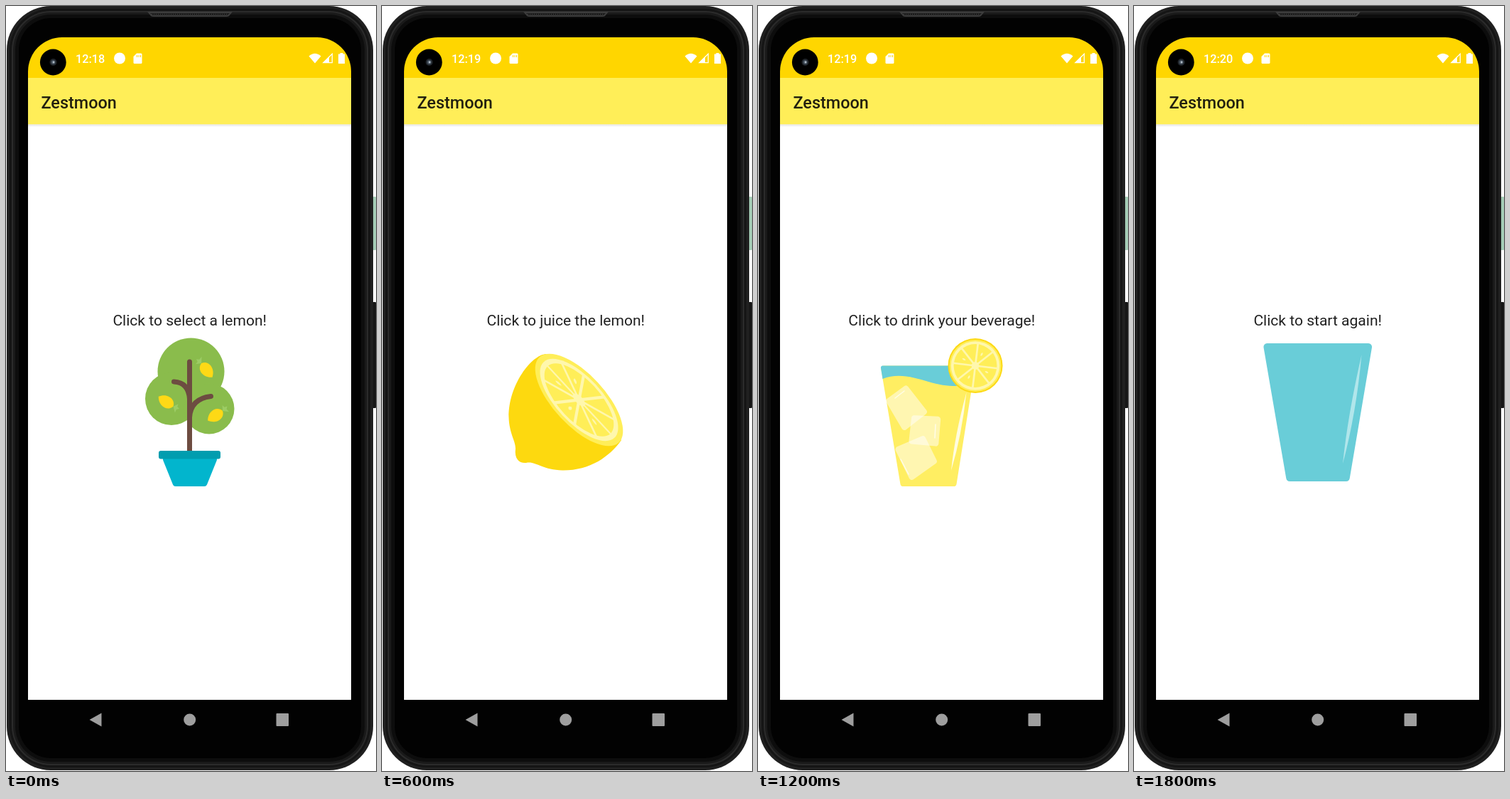
Recreate the animation shown at these times as an HTML page with a canvas. Size 521 by 1075 pixels, loop 2400 ms.

```html
<!DOCTYPE html>
<html lang="en">
<head>
<meta charset="utf-8">
<title>Juice app</title>
<style>
html, body { margin: 0; width: 100%; height: 100%; overflow: hidden; background: #fff; }
canvas { display: block; }
</style>
</head>
<body>
<canvas id="stage" width="521" height="1075"></canvas>
<script>
const ctx = document.getElementById('stage').getContext('2d');
const TAU = Math.PI * 2;
const STEP = 600;
const YELLOW = '#ffd600', LIGHT = '#ffee58', PALE = '#fff7ad', CYAN = '#69cdd8';

const steps = [
  { clock: '12:18', text: 'Click to select a lemon!', draw: drawTree },
  { clock: '12:19', text: 'Click to juice the lemon!', draw: drawLemon },
  { clock: '12:19', text: 'Click to drink your beverage!', draw: drawDrink },
  { clock: '12:20', text: 'Click to start again!', draw: drawEmptyGlass }
];

function fillPath(d, color) {
  ctx.fillStyle = color;
  ctx.fill(new Path2D(d));
}

function strokePath(d, color, width, cap = 'round') {
  ctx.strokeStyle = color;
  ctx.lineWidth = width;
  ctx.lineCap = cap;
  ctx.stroke(new Path2D(d));
}

function disc(x, y, r, color) {
  ctx.fillStyle = color;
  ctx.beginPath();
  ctx.arc(x, y, r, 0, TAU);
  ctx.fill();
}

function box(x, y, w, h, color, radius = 0) {
  ctx.fillStyle = color;
  ctx.beginPath();
  ctx.roundRect(x, y, w, h, radius);
  ctx.fill();
}

function roundPoly(points, radius, color) {
  const last = points[points.length - 1];
  ctx.fillStyle = color;
  ctx.beginPath();
  ctx.moveTo((last[0] + points[0][0]) / 2, (last[1] + points[0][1]) / 2);
  points.forEach((p, i) => {
    const next = points[(i + 1) % points.length];
    ctx.arcTo(p[0], p[1], next[0], next[1], radius);
  });
  ctx.closePath();
  ctx.fill();
}

function label(text, x, y, size, weight, color, align = 'left') {
  ctx.font = `${weight} ${size}px Roboto, sans-serif`;
  ctx.textAlign = align;
  ctx.fillStyle = color;
  ctx.fillText(text, x, y);
}

function placed(x, y, angle, draw, sx = 1, sy = 1) {
  ctx.save();
  ctx.translate(x, y);
  ctx.rotate(angle * Math.PI / 180);
  ctx.scale(sx, sy);
  draw();
  ctx.restore();
}

function drawBody() {
  // side buttons
  box(515, 268, 6, 75, '#a5cdb6', 1);
  box(515, 416, 6, 149, '#161616', 1);

  // nested shells: inset, color
  [[0, '#202020'], [4, '#151515'], [7, '#2b2b2b'], [9, '#1a1a1a'],
   [12, '#0d0d0d'], [17, '#020202']].forEach(([inset, color]) =>
    box(1 + inset, inset, 516 - inset * 2, 1074 - inset * 2, color, 62 - inset));

  fillPath('M199 8H319L314 14Q313 15 310 15H208Q205 15 204 14Z', '#3d3d3d');
  fillPath('M203 10H315L312 13H206Z', '#1d1d1d');
  ctx.setLineDash([1, 2]);
  strokePath('M205 11.5H313', '#4a4a4a', 1, 'butt');
  ctx.setLineDash([]);
}

function drawStatus(clock) {
  label(clock, 98, 79.5, 16.3, 500, '#fff');
  disc(160, 73.5, 8, '#fff');

  fillPath('M184 66.5H190Q191.500 66.500 191.500 68V79.500Q191.500 81 190 81H181Q179.500 81 179.500 79.500V71Z', '#fff');
  strokePath('M184.500 69V72M187 69V72M189.500 69V72', YELLOW, 1, 'butt');

  fillPath('M426.500 70.500Q435 63 443.500 70.500L435 80.500Z', '#fff');
  strokePath('M446.800 79.700L459.300 67.200V79.700Z', '#fff', 1.3);
  fillPath('M446 80L455 71V80Z', '#fff');
  fillPath('M470.500 66H474.500V67.500H477V81H468V67.500H470.500Z', '#fff');
}

function drawScreen(step) {
  box(31, 44, 455, 100, YELLOW, [48, 48, 0, 0]);
  box(31, 101, 455, 66, LIGHT);
  box(31, 166.5, 455, 808.5, '#fff');
  const shadow = ctx.createLinearGradient(0, 166, 0, 170);
  shadow.addColorStop(0, '#e0e0e0');
  shadow.addColorStop(1, '#fff');
  box(31, 166.5, 455, 3.5, shadow);

  disc(66.3, 79, 18.4, '#000');
  disc(66.5, 79, 5, '#20252b');
  disc(66.5, 79, 3, '#46525f');
  disc(67, 79, 1.4, '#b3bec9');

  drawStatus(step.clock);
  label('Zestmoon', 49.5, 143.5, 23.4, 500, '#22200f');
  label(step.text, 258.7, 449, 21.05, 400, '#212121', 'center');

  fillPath('M117.500 1003L134.500 993.500V1012.500Z', '#9e9e9e');
  disc(258.7, 1003, 8.5, '#9e9e9e');
  box(380.5, 994, 17.5, 18, '#9e9e9e', 1);
}

function smallLemon(x, y, angle) {
  placed(x, y, angle, () => {
    fillPath('M-12 0L-19 -6L-18 -1L-21 2L-17 3L-16 7Z', '#9ccc65');
    fillPath('M-12 0C-9 -11 6 -11 13 0C6 11 -9 11 -12 0Z', '#fdd916');
  });
}

function drawTree() {
  const leaf = '#8abc4c', wood = '#6d4c41';
  disc(260.5, 513.5, 47, leaf);
  disc(233, 552, 37, leaf);
  disc(286, 566, 35.5, leaf);
  smallLemon(282.5, 511.5, 52);
  smallLemon(225.5, 556, 214);
  smallLemon(295, 575.5, 147);
  strokePath('M258.500 500V628M236.500 528Q257 529 258.500 552M288.500 548.500Q260 552 258.500 578', wood, 7);
  roundPoly([[219, 633], [299, 633], [282, 675], [236, 675]], 4, '#02b5cd');
  box(215, 625, 87, 11.5, '#009daf', 3);
}

// A citrus cross-section of radius 100, centred on the origin
function citrus(rind, spokes, turn, spokeWidth) {
  disc(0, 0, 100, rind);
  disc(0, 0, 95, LIGHT);
  disc(0, 0, 89, PALE);
  disc(0, 0, 79, LIGHT);
  for (let i = 0; i < spokes; i++) {
    const a = turn + i * TAU / spokes;
    const x = Math.cos(a) * 82, y = Math.sin(a) * 82;
    strokePath(`M0 0L${x} ${y}`, PALE, spokeWidth, 'butt');
  }
  disc(0, 0, 14, PALE);
  for (let i = 0; i < 4; i++) {
    const a = turn + (i * 2 + 0.5) * TAU / spokes;
    placed(Math.cos(a) * 48, Math.sin(a) * 48, a * 360 / TAU, () =>
      fillPath('M-8 0Q0 -7 7 0Q0 7 -8 0', PALE));
  }
}

function drawLemon() {
  fillPath(`M231 489C211 490 178 532 178.500 578C179 600 188 611 188 622
    C186 637 194 643 203 642C216 639 225 652 254 652.500
    C292 653 320 634 337 610Z`, '#fdd90f');
  placed(277.5, 553.5, 47, () => citrus(LIGHT, 10, 0, 6), 0.82, 0.36);
}

function iceCube(points, glint) {
  roundPoly(points, 4, 'rgba(255,255,255,.5)');
  strokePath(glint, 'rgba(255,255,255,.7)', 1.5);
}

function drawDrink() {
  roundPoly([[172.5, 505.5], [306, 505.5], [279, 675], [201, 675]], 4, '#ffee62');
  fillPath(`M175.500 524C197 515 220 522 240 528C263 535 280 535 301.500 532.500
    L306 505.500H175Q172.500 506 173 509Z`, CYAN);
  iceCube([[179, 554], [209, 532], [239.500, 571], [205, 598]], 'M193 551L206 541');
  iceCube([[216.500, 575], [257.500, 577], [254, 619], [212, 615]], 'M250 588L249 607');
  iceCube([[192, 621], [234, 603], [253, 641], [215, 668]], 'M201 637L212 658');
  fillPath('M293.500 543Q287 603 272 653Q277 603 293.500 543', '#fffce0');
  placed(306, 505.5, 0, () => citrus('#fdd914', 8, 0.12, 7), 0.385, 0.385);
}

function drawEmptyGlass() {
  roundPoly([[181.500, 474], [336, 474], [303, 668], [215, 668]], 5, CYAN);
  fillPath('M320.500 490Q313 572 294 643Q301 575 320.500 490', '#b1e6eb');
}

function render(now) {
  const step = steps[Math.floor(now / STEP) % steps.length];
  ctx.fillStyle = '#fff';
  ctx.fillRect(0, 0, 521, 1075);
  drawBody();
  drawScreen(step);
  step.draw();
  requestAnimationFrame(render);
}

render(performance.now());
</script>
</body>
</html>
```
